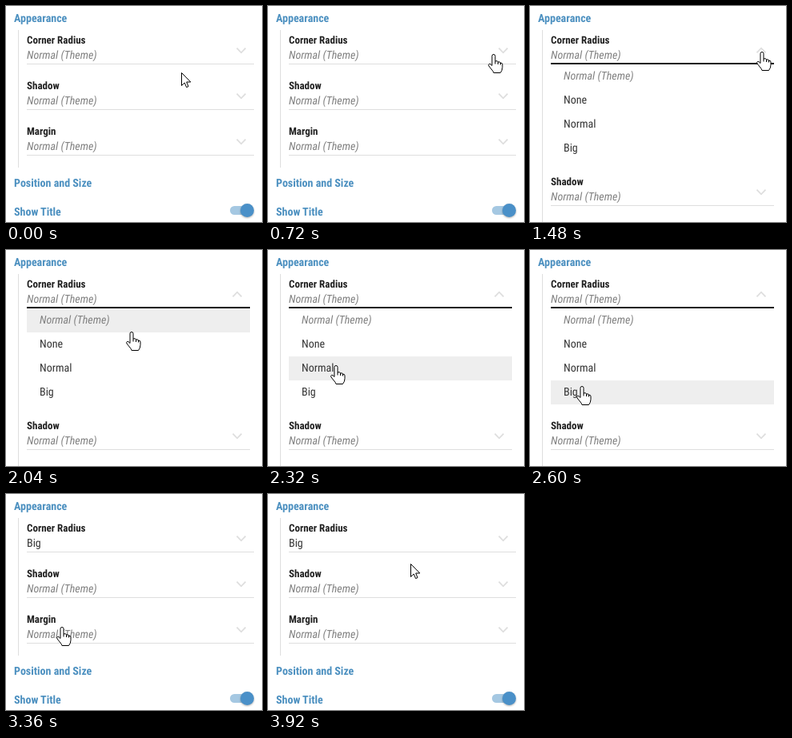
These frames come from a looping animation (320 by 270 pixels, 4160 ms). An HTML page:

```html
<!DOCTYPE html>
<html lang="en">
<head>
<meta charset="utf-8">
<title>Appearance settings</title>
<style>
  html, body { margin: 0; width: 100%; height: 100%; overflow: hidden; background: #fff; }
  svg { display: block; width: 320px; height: 270px; }
  text {
    font: 14px 'Roboto Condensed', Roboto, sans-serif;
    font-stretch: condensed;
    text-rendering: geometricPrecision;
    fill: #333;
  }
  .title { font-weight: 700; fill: #4c90c0; }
  .label { font-weight: 700; font-size: 13px; fill: #212121; }
  .theme { font-style: italic; fill: #808080; }
  .line { fill: #dedede; }
  .chevron { fill: none; stroke: #dedede; stroke-width: 1.8; }
  .cursor { fill: #fff; stroke: #000; stroke-linejoin: round; }
</style>
</head>
<body>
<svg id="stage" viewBox="0 0 320 270"></svg>
<script>
const LOOP = 4160, CLOCK = 40;
const ROW = 30, LIST_TOP = 73, FIELD_PITCH = 57;
const OPTIONS = ['Normal (Theme)', 'None', 'Normal', 'Big'];
const LIST_HEIGHT = OPTIONS.length * ROW;

const linear = p => p;
const smooth = p => p * p * (3 - 2 * p);
const easeOut = power => p => 1 - (1 - p) ** power;
const clamp = p => Math.min(1, Math.max(0, p));

// A phase advances in evenly spread steps, the first at start and the last at end
function phase(start, end, steps) {
  const gap = (end - start) / (steps - 1);
  return t => {
    let done = 0;
    while (done < steps && Math.round((start + done * gap) / CLOCK) * CLOCK <= t) done++;
    return done / steps;
  };
}

const expanding = phase(1120, 1480, 5);
const collapsing = phase(2880, 3360, 6);

const pointerStart = { x: 219, y: 83 };
const pointerMoves = [
  { x: 291, y: 58, progress: phase(440, 920, 6), ease: easeOut(2) },
  { x: 105, y: 121, progress: phase(1680, 2200, 7), ease: linear },
  { x: 65, y: 172, progress: phase(2320, 2800, 6), ease: easeOut(3.5) },
  { x: 178, y: 87, progress: phase(3360, 3920, 7), ease: smooth }
];

function pointerAt(t) {
  let { x, y } = pointerStart;
  for (const move of pointerMoves) {
    const part = move.ease(move.progress(t));
    x += (move.x - x) * part;
    y += (move.y - y) * part;
  }
  return [Math.round(x), Math.round(y)];
}

const text = (x, y, className, content) =>
  `<text x="${x}" y="${y}" class="${className}">${content}</text>`;

const field = (index, name) => `
  <g transform="translate(0 ${index * FIELD_PITCH})">
    ${text(26, 47, 'label', name)}
    ${text(26, 66, 'theme value', 'Normal (Theme)')}
    <rect class="line underline" x="26" y="72" width="284" height="1"/>
    <g class="handle"><path class="chevron" d="M-5.5-2.8L0 2.8L5.5-2.8"/></g>
  </g>`;

const stage = document.getElementById('stage');
stage.innerHTML = `
  <defs>
    <clipPath id="listClip"><rect id="listBox" y="${LIST_TOP}" width="320"/></clipPath>
    <filter id="soft" x="-50%" y="-50%" width="200%" height="200%">
      <feGaussianBlur stdDeviation="1.3"/>
    </filter>
  </defs>
  ${text(10, 20, 'title', 'Appearance')}
  <rect id="border" class="line" x="15" y="30" width="1"/>
  <g clip-path="url(#listClip)">
    <rect id="hover" x="26" width="279" height="${ROW}" fill="#eee"/>
    ${OPTIONS.map((name, i) => text(42, 92 + i * ROW, i ? '' : 'theme', name)).join('')}
  </g>
  ${field(0, 'Corner Radius')}
  <rect id="focus" x="26" y="71" width="279" height="2" fill="#161616"/>
  <g id="below">
    ${field(1, 'Shadow')}
    ${field(2, 'Margin')}
    ${text(10, 226, 'title', 'Position and Size')}
    ${text(10, 262, 'title', 'Show Title')}
    <rect x="280" y="250" width="28" height="11" rx="5.5" fill="#a5c8e2"/>
    <circle cx="301.5" cy="256.5" r="8.5" opacity=".3" filter="url(#soft)"/>
    <circle cx="301.5" cy="255.5" r="8.5" fill="#4a90c8"/>
  </g>
  <path id="arrow" class="cursor" d="M.5.5V16.5L4.2 13L6.6 18.6L9 17.6L6.7 12H11.8Z"/>
  <path id="hand" class="cursor" d="M-3 13.5V1.5a2 2 0 0 1 4 0V8q3-1.2 3.5 1q2.8-.8 3 1.2q2.5-.4 2.5 1.8
    V15.5q0 4-2.5 7H-1q-.5-2-2-3.5L-7 14q-1-2 .5-2.6q1.5-.4 3.5 2.1ZM1 8V11.5M4.5 9V12M7.5 10V12.5"/>`;

const byId = id => document.getElementById(id);
const all = selector => [...stage.querySelectorAll(selector)];
const set = (node, name, value) => node.setAttribute(name, value);
const show = (node, visible) => set(node, 'visibility', visible ? 'visible' : 'hidden');

const cornerValue = all('.value')[0];
const handles = all('.handle'), underlines = all('.underline');

function draw(t) {
  const [x, y] = pointerAt(t);
  const opening = expanding(t), closing = collapsing(t);
  const picked = closing > 0;

  // The chevron turns back in the first half of closing, the list folds in the second
  const height = LIST_HEIGHT * (easeOut(2)(opening) - smooth(clamp(closing * 2 - 1)));
  const turn = 180 * (clamp(opening * 2) - clamp(closing * 2));
  const expanded = height > 0;
  const right = expanded ? 305 : 310;

  set(byId('listBox'), 'height', height);
  set(byId('border'), 'height', 172 + height);
  set(byId('below'), 'transform', `translate(0 ${height})`);
  underlines.forEach(node => set(node, 'width', right - 26));
  handles.forEach((node, i) =>
    set(node, 'transform', `translate(${right - 16} 55.5) rotate(${i ? 0 : turn})`));
  show(byId('focus'), opening > 0 && !picked);

  cornerValue.textContent = picked ? 'Big' : 'Normal (Theme)';
  cornerValue.classList.toggle('theme', !picked);

  const row = Math.floor((y - LIST_TOP - 1) / ROW);
  show(byId('hover'), expanded && row >= 0);
  set(byId('hover'), 'y', LIST_TOP + row * ROW);

  const overField = y >= 50 && (y - 50) % FIELD_PITCH < 23;
  const pointing = expanded ? closing < 0.3 : overField;
  for (const id of ['arrow', 'hand']) {
    show(byId(id), (id === 'hand') === pointing);
    set(byId(id), 'transform', `translate(${x} ${y})`);
  }
}

const start = performance.now();
function tick() {
  draw((performance.now() - start) % LOOP);
  requestAnimationFrame(tick);
}
tick();
</script>
</body>
</html>
```
